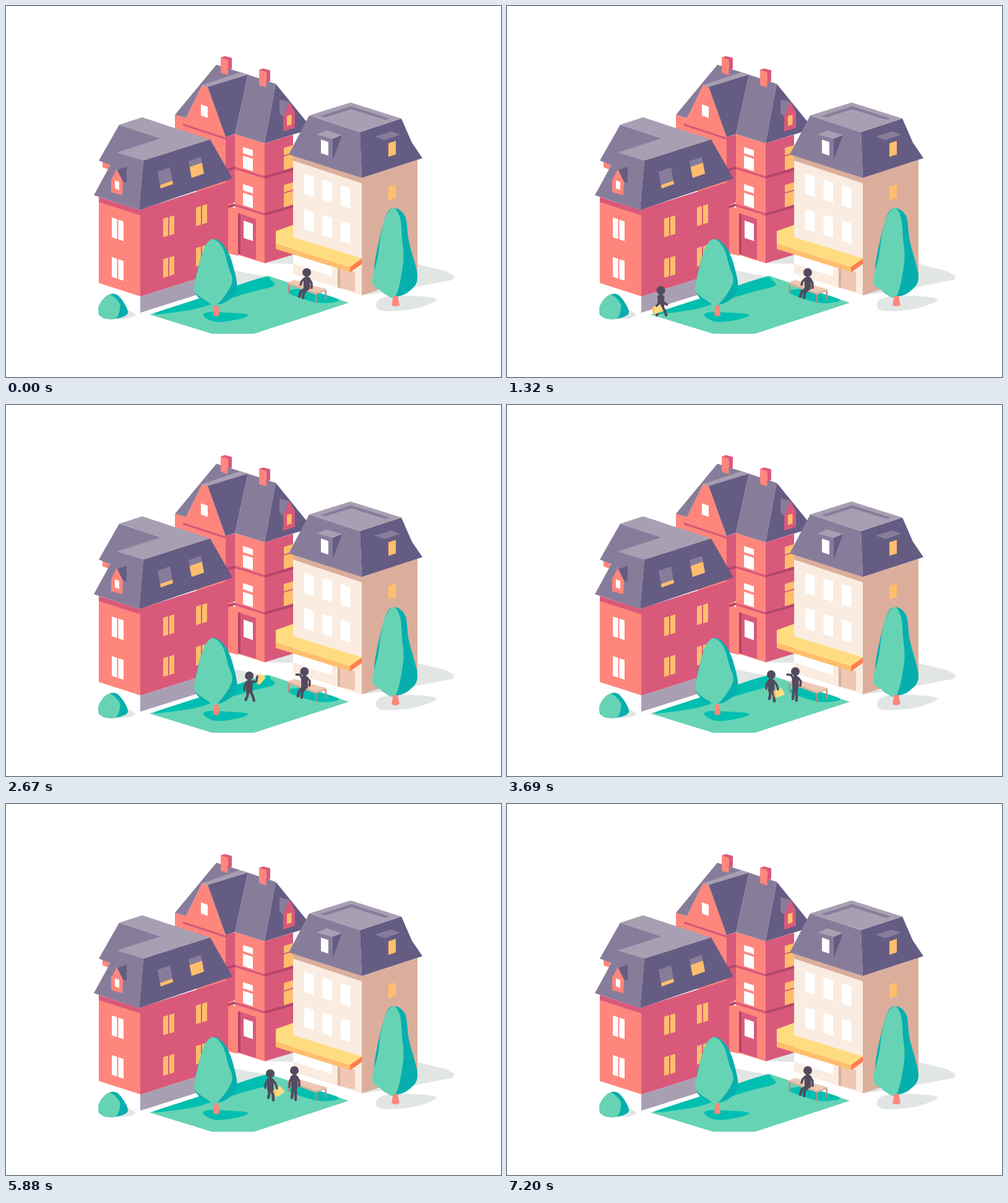
An HTML page that plays this animation: 800x600 px, repeating every 8130 ms.

```html
<!DOCTYPE html>
<html lang="en">
<head>
<meta charset="utf-8">
<title>Neighbours</title>
<style>
html, body { margin: 0; width: 100%; height: 100%; overflow: hidden; background: #fff; }
svg { display: block; width: 100vw; height: 100vh; }
.person { fill: none; stroke: #534b5d; stroke-linecap: round; stroke-linejoin: round; }
.person circle, .person .torso { fill: #534b5d; }
</style>
</head>
<body>
<svg viewBox="0 0 800 600">
  <defs><clipPath id="edge"><rect width="464" height="600"/></clipPath></defs>
  <g id="town"></g>
  <g clip-path="url(#edge)"><g id="walker" class="person"></g></g>
  <g id="sitter" class="person"></g>
  <g id="front"></g>
</svg>
<script>
const LOOP = 8130;
const C = {
  salmon: '#ff867c', pink: '#d9597a', maroon: '#b0466a', white: '#fff',
  top: '#a99fb2', mid: '#877d9b', dark: '#655c84',
  cream: '#faece0', tan: '#dbae9c', sand: '#eec8b4', wood: '#b98c83',
  amber: '#ffbe6d', yellow: '#ffdc80', orange: '#ff7f4e',
  mint: '#66d3b4', teal: '#06afae', shade: '#00bfb0', grey: '#e1e6e5'
};
const $ = id => document.getElementById(id);
let layer = $('town');

function make(tag, attrs, parent = layer) {
  const el = document.createElementNS('http://www.w3.org/2000/svg', tag);
  for (const k in attrs) el.setAttribute(k, attrs[k]);
  return parent.appendChild(el);
}
const poly = (color, points, parent) => make('polygon', { fill: C[color], points }, parent);

// Upright wall or window; k is the drop per pixel to the right
function wall(color, x, y, w, h, k) {
  const y2 = y + w * k;
  poly(color, `${x},${y} ${x + w},${y2} ${x + w},${y2 + h} ${x},${y + h}`);
}

// Closed smooth curve through a few points
function blob(color, points) {
  const p = points.split(' ').map(s => s.split(',').map(Number));
  const at = i => p[(i + p.length) % p.length];
  const ctrl = (i, side) => at(i).map((v, j) => v + side * (at(i + 1)[j] - at(i - 1)[j]) / 6);
  const d = p.map((_, i) => `C${ctrl(i, 1)} ${ctrl(i + 1, -1)} ${at(i + 1)}`);
  make('path', { fill: C[color], d: `M${p[0]}${d.join('')}Z` });
}

function drawGround() {
  blob('grey', '165,504 190,491 209,500 190,506');
  poly('grey', '355,424 395,433 420,437 355,460');
  poly('grey', '418,416 440,403 464,400 464,417');
  poly('grey', '655,415 712,429 725,437 722,443 700,447 640,459 575,468');
  blob('grey', '598,482 612,471 660,469 696,475 658,490 608,493');
}

function chimney(x, y) {
  wall('pink', x, y, 18, 6, .05);
  poly('pink', `${x},${y} ${x + 7},${y - 2} ${x + 18},${y + 1} ${x + 12},${y + 4}`);
  wall('salmon', x, y, 11.5, 25, .32);
  wall('pink', x + 11.5, y + 3.7, 6.5, 17, -.35);
}

function drawHall() {
  poly('salmon', '273,176 291,181 317,128 326,131 355,212 370,300 359,400 273,230');
  wall('pink', 286, 190, 69, 3.5, .33);
  wall('pink', 355, 212, 15, 110, -.3);
  wall('salmon', 359, 324, 16, 76, .25);
  wall('salmon', 370, 207, 48, 194, .31);
  wall('pink', 418, 222, 46, 194, -.3);
  for (const y of [260, 320]) {
    wall('maroon', 355, y + 4, 15, 4, -.3);
    wall('pink', 370, y, 48, 4, .31);
    wall('maroon', 418, y + 15, 46, 4, -.28);
  }
  wall('pink', 375, 335, 29, 66, .33);
  wall('maroon', 375, 335, 4, 66, .33);
  wall('white', 384, 347, 15, 28, .35);
  for (const y of [228, 288]) for (const [dy, h] of [[0, 10], [14, 20]]) {
    wall('white', 383, y + dy, 16, h, .33);
    wall('amber', 449, y + dy + 1.5, 15, h + 2, -.3);
  }
  wall('white', 315, 159, 11, 18, .36);

  poly('mid', '340,95 273,176 291,181 317,128 391,111');
  poly('top', '317,128 379,107 391,111 326,132');
  poly('dark', '326,131 391,111 370,207 355,212');
  poly('mid', '391,111 436,126 418,222 370,207');
  poly('dark', '436,126 488,190 483,202 418,222');
  poly('mid', '442,151 458,155 448,179 442,174');
  poly('pink', '458,155 467,172 467,197 448,203 448,179');
  wall('amber', 454, 178, 7.5, 16, -.3);
  chimney(347, 83);
  chimney(409, 103);
}

function drawLeftHouse() {
  wall('salmon', 156, 252, 11, 9, .33);
  wall('salmon', 150, 309, 67, 139, .32);
  wall('pink', 150, 309, 67, 8, .32);
  wall('pink', 217, 329, 142, 141, -.316);
  wall('top', 217, 470, 142, 26, -.316);
  poly('mid', '183,192 250,214 222,250 215,330 142,306 166,262 168,257 150,250');
  poly('top', '183,192 220,180 330,216 222,250 179,237 250,214');
  poly('dark', '222,250 330,216 366,279 215,330');
  poly('dark', '180,265 195,260 195,286 189,284');
  poly('salmon', '179,264 189,284 188,306 170,301 170,281');
  wall('white', 176, 282, 7, 13, .36);
  for (const [x, y, lit] of [[245, 268, .2], [295, 251, .65]]) {
    const edge = f => `${x + 5 * f},${y + 27 * f} ${x + 20 + 5 * f},${y - 7 + 27 * f}`;
    const [l, r] = edge(1).split(' ');
    poly('mid', `${edge(0)} ${r} ${l}`);
    poly('amber', `${edge(1 - lit)} ${r} ${l}`);
  }
  for (let row = 0; row < 2; row++) for (let pane = 0; pane < 2; pane++) {
    wall('white', 171 + pane * 10.5, 342 + row * 64 + pane * 3.5, 8.5, 32, .33);
    for (let col = 0; col < 2; col++)
      wall('amber', 254 + col * 53 + pane * 10, 344 + row * 65.5 - col * 18 - pane * 3, 8, 30, -.31);
  }
}

function drawShop() {
  wall('cream', 464, 243, 111, 190, .315);
  wall('tan', 464, 241, 111, 9, .33);
  wall('tan', 575, 278, 90, 190, -.33);
  poly('mid', '490,177 572,204 575,278 457,240');
  poly('dark', '572,204 639,182 656,221 673,246 575,278');
  poly('top', '490,177 557,156 639,182 572,204');
  poly('mid', '508,178 558,162 620,182 613,184 558,167 516,180');
  poly('top', '502,208 518,201 543,209 528,215');
  poly('dark', '528,215 543,209 528,249');
  wall('white', 509, 216, 12, 22, .33);
  poly('mid', '596,211 623,203 637,208 612,217');
  for (const y of [222, 292.5]) wall('amber', 618, y, 12, 22, -.33);
  for (let i = 0; i < 6; i++) {
    const col = i % 3, row = i < 3 ? 0 : 57;
    wall('white', 482 + col * 29.5, 271 + row + col * 9.4, 15.5, 33, .32);
  }
  wall('white', 464, 401, 63, 15.5, .33);
  wall('sand', 536, 423, 28, 32, .26);
  wall('tan', 536, 423, 4, 32, .26);
  poly('yellow', '436,364 464,354 464,374 575,408 556,422 436,385');
  wall('amber', 436, 385, 120, 8, .31);
  wall('orange', 556, 422, 19, 9, -.73);
}

function drawBench() {
  for (const [x, y] of [[455.5, 449], [499.5, 465], [515.5, 459]]) wall('wood', x, y, 2.5, 16, 0);
  poly('sand', '455,447 466,443 518,458 500,464');
  wall('tan', 455, 447, 45, 3, .37);
  wall('tan', 500, 464, 18, 3, -.33);
}

function drawGarden() {
  poly('mint', '232,499 423,436 554,480 401,530 333,530');
  blob('shade', '240,497 310,474 411,440 429,444 432,453 395,463 345,478 310,489 268,496');
  blob('shade', '319,501 328,495 360,496 391,499 378,506 340,511');
  blob('shade', '456,464 480,458 538,475 505,480');
  blob('teal', '627,327 645,340 651,380 665,438 652,461 629,470 606,460 595,425 612,345');
  blob('mint', '627,327 637,343 640,375 642,415 629,470 606,460 592,446 601,405 606,370 614,340');
  poly('salmon', '626,469 633,469 636,484 629,486 623,484');
  blob('teal', '150,492 165,468 182,469 197,496 176,506 155,503');
  blob('mint', '149,490 156,475 168,467 183,480 183,495 176,506 156,504');
  drawBench();
}

function drawFrontTree() {
  layer = $('front');
  blob('teal', '335,377 354,390 367,420 372,462 341,483 306,463 318,398');
  blob('mint', '335,377 350,391 359,420 365,448 341,483 325,478 306,463 305,450 313,415 322,388');
  poly('salmon', '337,484 343,484 345,500 340,502 335,500');
}

const clamp = u => Math.min(1, Math.max(0, u));
const mix = (a, b, u) => a.map((v, i) => v + (b[i] - v) * u);
function ramp(t, from, to) {
  const u = clamp((t - from) / (to - from));
  return u * u * (3 - 2 * u);
}
// Rises over a..b, falls over c..d
const pulse = (t, a, b, c, d) => ramp(t, a, b) - ramp(t, c, d);

function makePerson(id) {
  layer = $(id);
  return {
    box: layer,
    legs: make('path', { 'stroke-width': 4.4 }),
    torso: make('path', { class: 'torso', 'stroke-width': 3 }),
    head: make('circle', { r: 7, stroke: 'none' }),
    arms: make('path', { 'stroke-width': 3.5 })
  };
}

// Two-part limb whose joint is pushed sideways by bend
function limb(x, y, [ex, ey], bend) {
  const len = Math.hypot(ex - x, ey - y) || 1;
  const jx = (x + ex) / 2 - bend * (ey - y) / len;
  const jy = (y + ey) / 2 + bend * (ex - x) / len;
  return `M${x} ${y}L${jx} ${jy} ${ex} ${ey}`;
}

// Coordinates are relative to the head; each pair is left, right
function setPose(p, hands, feet, elbows, knees) {
  p.torso.setAttribute('d', 'M0 7L4 10 4 26H-3.5L-4 10Z');
  p.arms.setAttribute('d', limb(-4, 10, hands[0], elbows[0]) + limb(4, 10, hands[1], elbows[1]));
  p.legs.setAttribute('d', limb(-2, 26, feet[0], knees[0]) + limb(2, 26, feet[1], knees[1]));
}

function renderSitter(t) {
  const seated = 1 - pulse(t, 2450, 3250, 5980, 6750);
  const wave = pulse(t, 1850, 2250, 3840, 4400) + .6 * pulse(t, 4680, 5050, 5100, 5500);
  const rest = mix([-8, 27], [-10, 20], seated);
  const hands = [mix(rest, [-13, 5], wave), [8, 25 - 2 * wave]];
  const feet = [[-4 - 8 * seated, 44 - 5 * seated], [2 - 8 * seated, 47 - 6 * seated]];
  setPose(sitter, hands, feet, [1.5 + wave, -2 - wave], [3 * seated, 3 * seated]);
  sitter.box.setAttribute('transform', `translate(${466 + 20 * seated} 431)`);
}

function renderWalker(t) {
  // Stroll in at constant speed, later leave behind the shop
  const inX = Math.min(427, 393 + .107 * (t - 2670));
  const inY = Math.max(436, 438 - .152 * (inX - 393));
  const away = clamp((t - 6000) / 1200) ** 1.25;
  const [x, y] = mix([inX, inY], [473, 378], away);

  const gait = 1 - ramp(t, 2850, 3100) + .7 * ramp(t, 6000, 6200);
  const phase = 2 * Math.PI * (t - 1320) / 440;
  const swing = Math.cos(phase);
  const foot = side => [
    side * 4 + 1 + gait * side * (7.5 * swing - 4),
    41 + side * 2 * (1 - gait) - gait * (1 + 3 * Math.max(0, -side * Math.sin(phase)))
  ];

  const stroll = 1 - ramp(t, 2200, 2560);
  const hail = pulse(t, 2200, 2560, 2720, 3250);
  const offer = pulse(t, 3840, 4450, 4700, 5300);
  const free = mix(mix([-8, 23], [2 + 8 * swing, 23], stroll), [-4, 20], offer);
  let hold = mix([11, 24], [2 - 9 * swing, 25], stroll);
  hold = mix(mix(hold, [13, 1], hail), [15, 8], offer);
  setPose(walker, [free, hold], [foot(-1), foot(1)], [1.5 + 3 * offer, -1.5 + 6 * hail + 3 * offer], [-1, -1]);

  const tilt = -8 - 30 * hail + 12 * offer - 14 * pulse(t, 4700, 5300, 6100, 6500);
  bag.setAttribute('transform', `translate(${hold}) rotate(${tilt})`);
  walker.box.setAttribute('transform', `translate(${x} ${y}) scale(${1 - .12 * away})`);
  walker.box.setAttribute('opacity', t < 7200 ? clamp((t - 450) / 250) : 0);
}

[drawGround, drawHall, drawLeftHouse, drawShop, drawGarden, drawFrontTree].forEach(draw => draw());
const sitter = makePerson('sitter');
const walker = makePerson('walker');
const bag = make('g', { stroke: 'none' });
poly('amber', '-4,0 -8,2 -7,13 -5,12', bag);
poly('yellow', '-4,0 6,-2 10,10 -5,13', bag);
walker.box.appendChild(walker.arms);

function tick() {
  const t = performance.now() % LOOP;
  renderSitter(t);
  renderWalker(t);
  requestAnimationFrame(tick);
}
tick();
</script>
</body>
</html>
```
